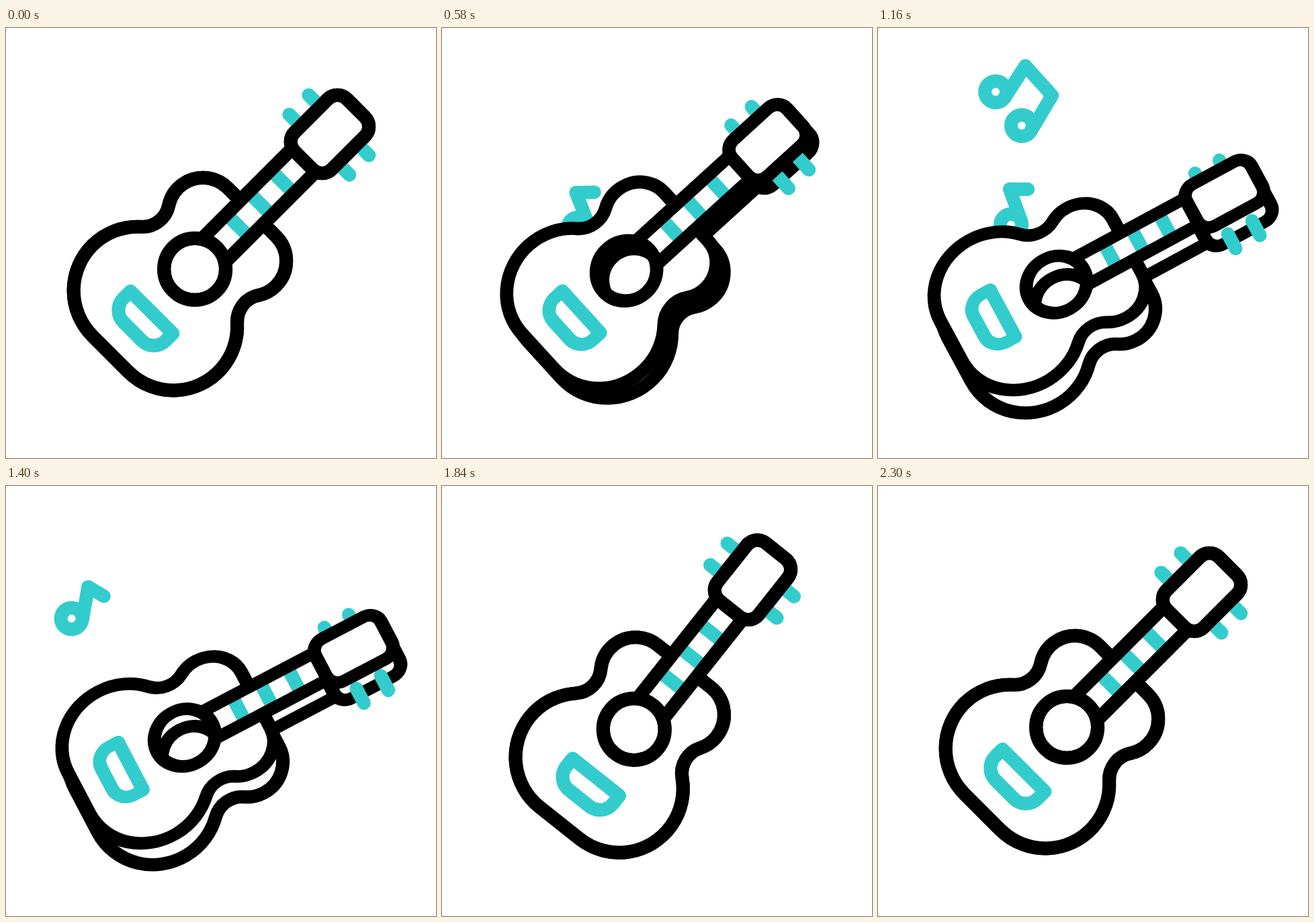
Recreate the animation shown at these times as an HTML page with a canvas. Size 640 by 640 pixels, loop 2.6 s.

```html
<!DOCTYPE html>
<html lang="en">
<head>
<meta charset="utf-8">
<title>Guitar</title>
<style>
html, body { margin: 0; width: 100%; height: 100%; overflow: hidden; background: #fff; }
canvas { display: block; width: 100vw; height: 100vh; }
</style>
</head>
<body>
<canvas id="stage" width="640" height="640"></canvas>
<script>
const ctx = document.getElementById('stage').getContext('2d');
const LOOP = 2600, STEP = 20, LINE = 20.2;
const INK = '#000', TEAL = '#33cccc', PAPER = '#fff';
const PI = Math.PI, RAD = PI / 180;
const NOTE_LIFE = 560;

function ease(t, from, to) {
  const u = Math.min(1, Math.max(0, (t - from) / (to - from)));
  return u * u * (3 - 2 * u);
}

// Jump up, lean over quickly, then drift on slowly
function leanOver(t, jump, swing, drift) {
  return jump * ease(t, 200, 400) + swing * ease(t, 400, 700) + drift * ease(t, 680, 1260);
}

function pose(t) {
  return {
    angle: 45 + leanOver(t, -8.6, 17.4, 8.5)
      - 27.7 * ease(t, 1450, 1960) + 15.9 * ease(t, 1960, 2140) - 5.5 * ease(t, 2140, 2300),
    lift: leanOver(t, -32, 66.4, 17.6)
      - 68 * ease(t, 1300, 1740) + 22 * ease(t, 1740, 1900) - 6 * ease(t, 1900, 2100),
    depth: leanOver(t, 0, 0.76, 0.24) - ease(t, 1300, 1840)
  };
}

function line(points, color, cap = 'butt') {
  ctx.beginPath();
  points.forEach(([x, y]) => ctx.lineTo(x, y));
  ctx.lineCap = cap;
  ctx.strokeStyle = color;
  ctx.stroke();
}

function ring(x, y, r, color) {
  ctx.beginPath();
  ctx.arc(x, y, r, 0, 2 * PI);
  ctx.strokeStyle = color;
  ctx.stroke();
}

// Tangent arcs: shoulder, waist and lower bout on each side
function bodyPath() {
  const top = [50.9, -67.9], waist = [127.9, -17.6], low = [37.8, 83];
  const a = Math.atan2(waist[1] - top[1], waist[0] - top[0]);
  const b = Math.atan2(waist[1] - low[1], waist[0] - low[0]);
  ctx.beginPath();
  ctx.arc(top[0], top[1], 52, -PI / 2, a);
  ctx.arc(waist[0], waist[1], 40, a + PI, b + PI, true);
  ctx.arc(low[0], low[1], 95, b, PI / 2);
  ctx.arc(-low[0], low[1], 95, PI / 2, PI - b);
  ctx.arc(-waist[0], waist[1], 40, -b, -a, true);
  ctx.arc(-top[0], top[1], 52, PI - a, PI * 1.5);
  ctx.closePath();
}

function body(width, open) {
  ctx.save();
  ctx.scale(width, 1);
  ctx.fillStyle = PAPER;
  ctx.strokeStyle = INK;
  bodyPath();
  if (open) {
    ctx.moveTo(46, 0);
    ctx.arc(0, 0, 46, 0, 2 * PI);
  }
  ctx.fill('evenodd');
  bodyPath();
  ctx.stroke();
  ctx.restore();
}

function neck(frets) {
  ctx.fillStyle = PAPER;
  ctx.fillRect(-24.5, -229, 49, 187);
  for (let i = 0; i < frets; i++) {
    const y = -91 - 46.5 * i;
    line([[-24.5, y], [24.5, y]], TEAL);
  }
  for (const x of [-24.5, 24.5]) line([[x, -42], [x, -229]], INK);

  ctx.beginPath();
  ctx.roundRect(-39, -339, 78, 110, 20);
  ctx.fill();
  ctx.strokeStyle = INK;
  ctx.stroke();
  ring(0, 0, 46, INK);
}

function pegs() {
  for (const y of [-303, -262])
    for (const side of [-1, 1])
      line([[side * 39, y], [side * 63.5, y]], TEAL, 'round');
}

function bridge() {
  ctx.beginPath();
  ctx.moveTo(-44.5, 91);
  ctx.lineTo(44.5, 91);
  ctx.arcTo(44.5, 131, 0, 131, 25);
  ctx.arcTo(-44.5, 131, -44.5, 91, 25);
  ctx.closePath();
  ctx.strokeStyle = TEAL;
  ctx.stroke();
}

function guitar(t) {
  const { angle, lift, depth } = pose(t);
  const squeeze = 1 - 0.1 * depth;
  ctx.save();
  ctx.translate(320, 320 + lift);
  ctx.rotate(angle * RAD);
  ctx.translate(0, 55);
  ctx.lineWidth = LINE;

  // Back plate, a little wider at the body
  ctx.save();
  ctx.translate(14.4 * depth, 0);
  ctx.scale(squeeze, 1);
  body(1 + 0.07 * depth, false);
  neck(0);
  ctx.restore();

  pegs();

  // Front plate, open at the sound hole
  ctx.translate(-16.4 * depth, -2 * depth);
  ctx.scale(squeeze, 1);
  body(1, true);
  neck(3);
  bridge();
  ctx.restore();
}

function singleNote() {
  line([[17.2, 46], [0, 0], [27.5, 0]], TEAL, 'round');
  ring(2.5, 53, 16, TEAL);
}

function doubleNote() {
  line([[-21.4, -4.6], [9, -52], [49, -8], [17.6, 45.4]], TEAL, 'round');
  ring(-35, -13, 16, TEAL);
  ring(4, 37, 16, TEAL);
}

const single = { draw: singleNote, x: 172, sway: 50, top: 122, rise: 192, turn: -16, spin: 0.125 };
const double = { draw: doubleNote, x: 213, sway: 4, top: 92, rise: 345, turn: -90, spin: 0.192 };

// Notes float up from behind the body, slowing and turning, then shrink away
function note(kind, age) {
  if (age < 0 || age >= NOTE_LIFE) return;
  const size = 1 - ease(age, NOTE_LIFE - 80, NOTE_LIFE);
  ctx.save();
  ctx.translate(
    kind.x + kind.sway * Math.cos(PI * age / 380),
    kind.top + kind.rise * (1 - age / 600) ** 2
  );
  ctx.rotate((kind.turn + kind.spin * age) * RAD);
  ctx.scale(size, size);
  ctx.lineWidth = 20;
  kind.draw();
  ctx.restore();
}

function render(now) {
  const t = Math.floor((now % LOOP) / STEP) * STEP;
  ctx.fillStyle = PAPER;
  ctx.fillRect(0, 0, 640, 640);
  ctx.lineJoin = 'round';
  note(single, t - 460);
  note(double, t - 690);
  note(single, t - 1030);
  guitar(t);
}

const start = performance.now();
function tick() {
  render(performance.now() - start);
  requestAnimationFrame(tick);
}
tick();
</script>
</body>
</html>
```
